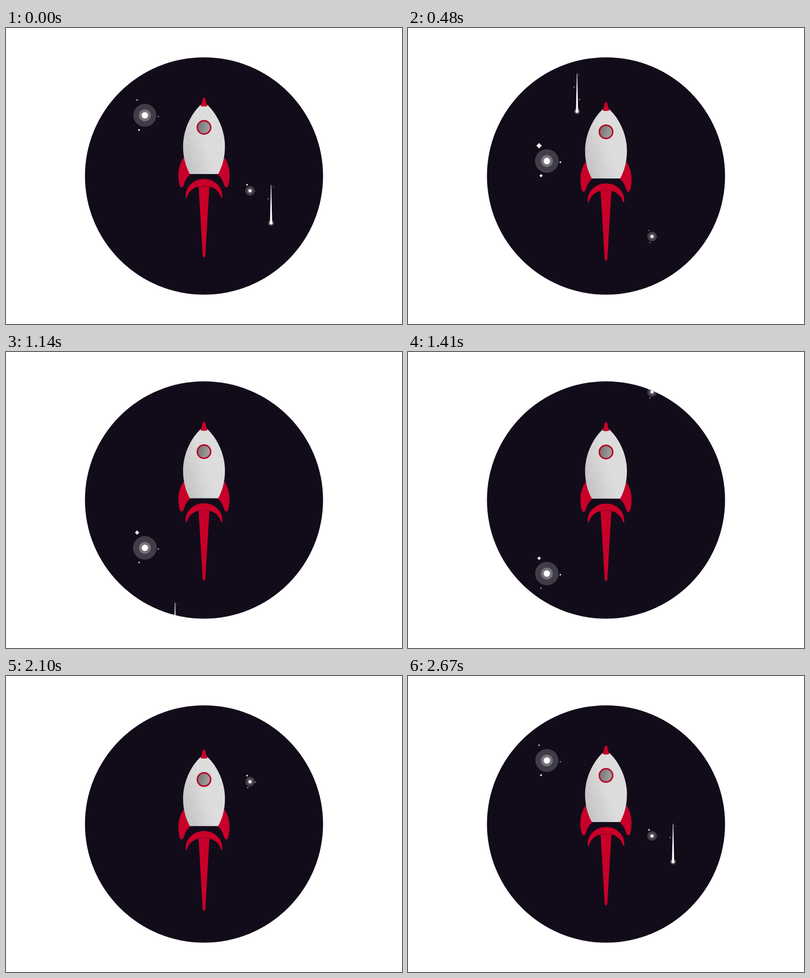
An HTML page with a canvas for the animation above (2.7 s loop, 800 by 600 pixels).

```html
<!DOCTYPE html>
<html lang="en">
<head>
<meta charset="utf-8">
<title>Rocket</title>
<style>
  html, body { margin: 0; width: 100%; height: 100%; overflow: hidden; background: #fff; }
  canvas { display: block; }
</style>
</head>
<body>
<canvas id="stage" width="800" height="600"></canvas>
<script>
const ctx = document.getElementById('stage').getContext('2d');
const LOOP = 2700, STEP = 30, RED = '#c80029';

const shapes = {
  fin: 'M361 260C351 272 348 286 348.4 300C348.7 311 350.5 323 355 323C361 323 358 308 373 296Z',
  body: 'M393 156C372 176 357.7 208 357.7 240C357.7 262 363 281 371.5 296H428.5C437 281 442.3 262 442.3 240C442.3 208 428 176 407 156Z',
  nose: 'M393 158C396 152 396.3 146 397.5 142.8Q400 139.2 402.5 142.8C403.7 146 404 152 407 158Q400 160.5 393 158Z',
  crescent: 'M363 342C362 322 379 306 400 306C421 306 438 322 437 342Q436.3 346.5 434.3 343C430 328 417 320 400 320C383 320 370 328 365.7 343Q363.7 346.5 363 342Z'
};
for (const name in shapes) shapes[name] = new Path2D(shapes[name]);

function shade(x0, y0, x1, y1, from, to) {
  const g = ctx.createLinearGradient(x0, y0, x1, y1);
  g.addColorStop(0, from);
  g.addColorStop(1, to);
  return g;
}
const bodyShade = shade(358, 250, 405, 235, '#c6c6c6', '#dedede');
const glassShade = shade(388, 198, 412, 204, '#777', '#a2a2a2');

// Fine seeded speckle on the hull
let seed = 7;
const random = () => (seed = seed * 16807 % 2147483647) / 2147483647;
const grain = new Path2D();
for (let i = 0; i < 1800; i++) grain.rect(358 + 84 * random() | 0, 157 + 139 * random() | 0, 1, 1);

// Cosine-eased value through [time, value] keys
function eased(t, ...keys) {
  const i = keys.findIndex(([time]) => time > t);
  const [t0, v0] = keys[i - 1], [t1, v1] = keys[i];
  return v0 + (v1 - v0) * (1 - Math.cos(Math.PI * (t - t0) / (t1 - t0))) / 2;
}

function disc(x, y, r, fill) {
  ctx.fillStyle = fill;
  ctx.beginPath();
  ctx.arc(x, y, r, 0, 2 * Math.PI);
  ctx.fill();
}

function sparkle(x, y, r, alpha = 0.9) {
  if (r <= 0) return;
  ctx.fillStyle = `rgba(255,255,255,${alpha})`;
  ctx.beginPath();
  ctx.moveTo(x, y - r);
  ctx.lineTo(x + r, y);
  ctx.lineTo(x, y + r);
  ctx.lineTo(x - r, y);
  ctx.fill();
}

function star(x, y, outer, middle, core) {
  disc(x, y, outer, 'rgba(255,255,255,.2)');
  disc(x, y, middle, 'rgba(255,255,255,.28)');
  disc(x, y, core, '#fff');
}

// Vertical drift; one loop carries a star 521 px and wraps it out of sight
const drift = (start, t) => 55 + (start - 55 + 521 * t / LOOP) % 521;

function bigStar(t) {
  const x = 280.5, y = drift(177, t);
  star(x, y, eased(t, [0, 23.2], [600, 24], [LOOP, 23.2]), 12, 6.5);
  sparkle(x - 15.7, y - 31, eased(t, [0, 1.7], [540, 5.7], [870, 5.1], [1410, 3.7], [LOOP, 1.7]));
  sparkle(x - 11.7, y + 29.7, eased(t, [0, 2.4], [480, 3.4], [1410, 1.5], [LOOP, 2.4]));
  sparkle(x + 27.2, y + 2.5, eased(t, [0, 1.3], [480, 2.2], [870, 1.2], [1410, 2], [LOOP, 1.3]));
}

function smallStar(t) {
  const x = 493, y = drift(330, t);
  star(x, y, 9.7, 5, 2.8);
  sparkle(x - 6, y - 12.3, eased(t, [0, 2.2], [480, 1.1], [870, 1.5], [1740, 1.1], [2200, 2.2], [LOOP, 2.2]));
  sparkle(x + 11, y + 1, eased(t, [0, 0.6], [1740, 0.7], [2100, 1.2], [LOOP, 0.6]));
  sparkle(x - 4.5, y + 12, eased(t, [0, 0], [480, 1.1], [2100, 1.4], [LOOP, 0]));
}

function comet(x, top, start, t) {
  const age = (t - start + LOOP) % LOOP, y = top + 0.63 * age;
  const glow = ctx.createRadialGradient(x, y, 2, x, y, 7);
  glow.addColorStop(0, 'rgba(255,255,255,.5)');
  glow.addColorStop(1, 'rgba(255,255,255,0)');
  disc(x, y, 7, glow);
  disc(x, y, 3, '#fff');
  ctx.beginPath();
  ctx.moveTo(x - 0.4, y - 77);
  ctx.lineTo(x + 0.4, y - 77);
  ctx.lineTo(x + 2.2, y);
  ctx.lineTo(x - 2.2, y);
  ctx.fill();
  sparkle(x - 6, y - 49, 1.2, 0.8);
  sparkle(x + 4, y - 73, 0.9, 0.7);
  sparkle(x + 5, y - 24, 2.2 * (1 - age / 450));
}

function fill(shape, color) {
  ctx.fillStyle = color;
  ctx.fill(shape);
}

function rocket(t) {
  const bob = eased(t, [0, 0], [540, 9.2], [1245, 0], [1950, 9.2], [LOOP, 0]);
  const stretch = eased(t, [0, 0], [480, -2], [1410, -2], [1740, -4.5], [2100, 3], [LOOP, 0]);
  ctx.save();
  ctx.translate(0, bob);

  fill(shapes.crescent, RED);
  const tip = 465 + stretch;
  fill(new Path2D(`M389 320.5H411L402.7 ${tip - 4}Q402 ${tip} 400 ${tip}Q398 ${tip} 397.3 ${tip - 4}Z`), RED);
  ctx.fillStyle = 'rgba(110,0,30,.35)';
  ctx.fillRect(389, 320, 22, 0.7);

  fill(shapes.fin, RED);
  ctx.save();
  ctx.translate(800, 0);
  ctx.scale(-1, 1);
  fill(shapes.fin, RED);
  ctx.restore();

  fill(shapes.body, bodyShade);
  ctx.save();
  ctx.clip(shapes.body);
  fill(grain, 'rgba(60,60,60,.07)');
  ctx.restore();
  fill(shapes.nose, RED);

  disc(400, 201.5, 15, '#b80026');
  disc(400, 201.5, 12, glassShade);
  ctx.restore();
}

function draw(now) {
  const t = Math.floor(now % LOOP / STEP) * STEP;
  ctx.clearRect(0, 0, 800, 600);
  disc(400, 300, 240.5, '#120c1a');
  ctx.save();
  ctx.clip();
  bigStar(t);
  smallStar(t);
  comet(535.5, 40, 2136, t);
  comet(341.5, 55.6, 300, t);
  ctx.restore();
  rocket(t);
}

let begin;
function tick(now) {
  begin ??= now;
  draw(now - begin);
  requestAnimationFrame(tick);
}
draw(0);
requestAnimationFrame(tick);
</script>
</body>
</html>
```
